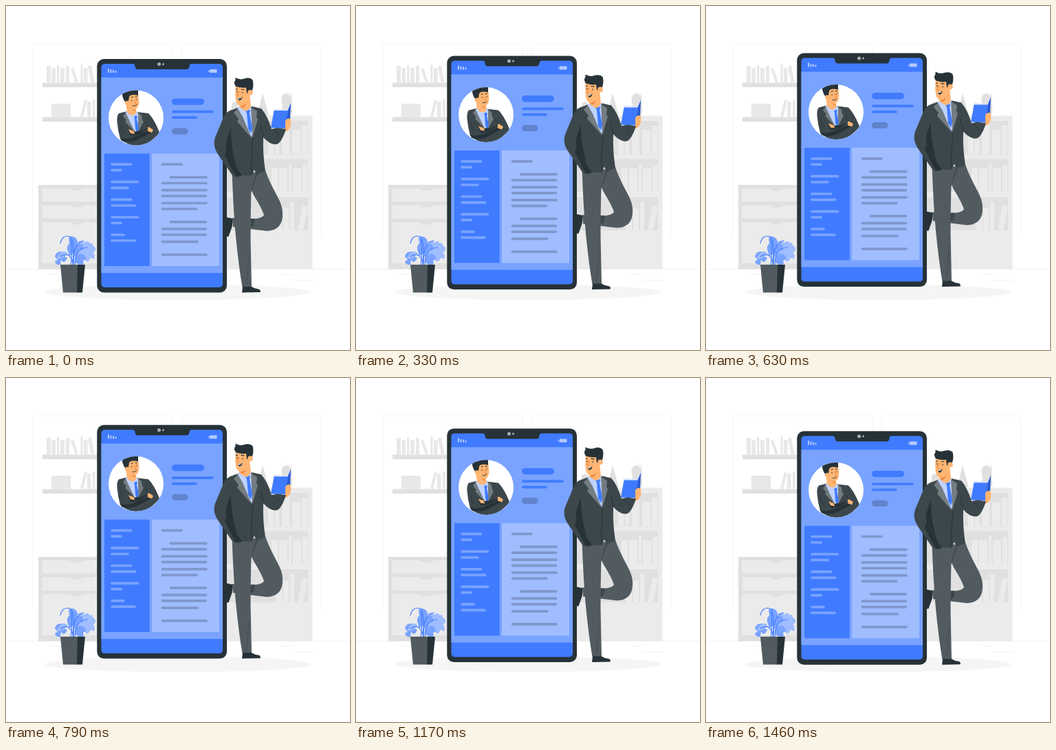
Write an HTML page that moves like this. It is 500 by 500 pixels and loops after 1500 ms.

```html
<!DOCTYPE html>
<html lang="en">
<head>
<meta charset="utf-8">
<title>Floating profile</title>
<style>
html, body { margin: 0; height: 100%; overflow: hidden; background: #fff; }
svg { display: block; width: 100%; height: 100%; }
.blue { fill: #407bff; }
.mid { fill: #79a3ff; }
.pale { fill: #9fbdff; }
.dark { fill: #263238; }
.jacket { fill: #3c474c; }
.trousers { fill: #515b60; }
.lapel { fill: #737c81; }
.shirt { fill: #c0d3ff; }
.skin { fill: #ffb573; }
.frame { fill: #ebebeb; }
.shade { fill: #e0e0e0; }
.line { fill: none; stroke-linecap: round; stroke-linejoin: round; }
</style>
</head>
<body>
<svg viewBox="0 0 500 500">
  <defs><clipPath id="disc"><circle cx="189" cy="162.5" r="40"/></clipPath></defs>

  <!-- room -->
  <g class="line" stroke="#f5f5f5">
    <path d="M39 336V58q0-3 3-3H239q3 0 3 3V336M255 336V58q0-3 3-3H455q3 0 3 3V336"/>
    <path stroke="#ededed" stroke-width=".7" d="M0 382.5H500M400 390h17M417 398.500h30M62 390h20"/>
  </g>

  <!-- wall shelves -->
  <path class="shade" d="M53 111.500h82v6.500H53zM53 161.500h82v6.500H53z"/>
  <path fill="#e8e8e8" d="M59 87h6v24.500h-6zM66.500 90h5.500v21.500h-5.500zM74 86h3.500v25.500H74zM79 90h6v21.500h-6zM87 87h5v24.500h-5zM94 91l4-1 7 20.500-4 1zM108.500 85h3v26.500h-3zM113 90h5.500v21.500H113zM119 87.500l5-1 4.500 24-5 1zM66 142h28v19.500H66zM108 160.500l6-24 4 1-6 24zM118 139h5.500v22.500H118zM126 136h3.500v25.500H126z"/>

  <!-- drawers -->
  <path class="shade" d="M47 260h90v122.500H47z"/>
  <path class="frame" d="M52.500 265H137v19.500H52.500zM52.500 289.500H137v19.500H52.500zM52.500 314H137v60H52.500z"/>
  <path class="shade" d="M89 265h28q-5 0-7 2-9 3-15 0-2-2-6-2zM89 289.500h28q-5 0-7 2-9 3-15 0-2-2-6-2zM89 314h28q-5 0-7 2-9 4-15 0-2-2-6-2z"/>

  <!-- bookcase -->
  <path class="shade" d="M365 159l8-32 9 32zM400 159l2-15q-4-12 2-16 8-3 9 4l2-7 1 30-2 4zM328 159v-17q5-6 9 0v17z"/>
  <path class="frame" d="M310 159.500H445.500V382.500H310z"/>
  <path class="shade" d="M318 167H439v48.500H318zM318 222.500H439v47.500H318zM318 278H439v48H318z"/>
  <path class="frame" d="M381 181h8v34.500h-8zM391 176h6v39.500h-6zM401 170h11v45.500h-11zM416 180h12v35.500h-12zM430 174h8v41.500h-8zM386 236h9v34h-9zM397 236h12v34h-12zM411 229h4v41h-4zM417 236h12v34h-12zM431 231h7v39h-7zM392 288h9v38h-9zM403 294h8v32h-8zM413 285h6v41h-6zM424 325l7-35 8 1.500-7 34z"/>

  <ellipse cx="250" cy="416" rx="193.500" ry="11.300" fill="#f5f5f5"/>

  <!-- plant -->
  <path class="pale" d="M104 343q5-4 10 1 4-5 8 1l3-1 1 4q5 2 4 8-3 0-3 3 3 3 1 9l-5-2q-3 7-7 5l-1-6-5 3-3-5-5 1q-3-4 2-7l-3-4q2-4 6-3z"/>
  <path class="mid" d="M91 337q5-4 10 0 4 4 3 9l6 0q4 5 1 9l-5-1q-1 8-7 11l-2-5-5 4-2-7q-3-7 2-12zM71 364q2-8 10-7 7-1 8 4l-4 3 4 2q-2 6-6 6l-3-3-1 7q-7 1-8-5l4-2zM100 366q7-9 14-4l3 6-5 2 1 4q-3 6-6 7l-2-6q-6-1-5-9z"/>
  <path class="pale" d="M82 357q6-1 7 3l-8 7-8 1q4-8 9-11z"/>
  <path class="line" stroke="#407bff" stroke-width="1.100" d="M79 345q3-13 14-10 7 4 5 42M97 377q0-32 16-36M98 377q-4-22-19-13M100 377q0-25 18-26M94 377q3-18 1-37"/>
  <path class="trousers" d="M79 376h26l-1 40.500H83z"/>
  <path class="dark" d="M104 376h11l-4 40.500h-8z"/>

  <g id="float">
    <!-- lifted foot and leg -->
    <path class="dark" d="M330 309l-1.500 12-5 14q-3.500 1-3.500-2V307z"/>

    <!-- phone -->
    <rect class="dark" x="132.300" y="77" width="188.700" height="339.500" rx="10"/>
    <rect class="blue" x="138.500" y="84" width="176.500" height="325" rx="5"/>
    <path class="dark" d="M184 83.500q3 .5 3.500 4 .5 4.500 4 4.500h71q3.500 0 4-4.500 .5-3.500 3.500-4z"/>
    <g fill="#a9afb3"><circle cx="222.500" cy="84.500" r="2.500"/><circle cx="228.500" cy="84.500" r="1.500"/></g>
    <path fill="#b3caff" d="M148 91h2v6h-2zM151.500 92.300h2V97h-2zM155 93h2v4h-2zM158.500 94h2v3h-2zM296 92h10.500v5H296zM294 93.500h1.300v2.500H294z"/>
    <path class="mid" d="M138.500 104H315V388H138.500z"/>
    <path class="blue" d="M143 214.500h65.700V378H143z"/>
    <path class="pale" d="M212 214.500h98V378h-98z"/>
    <g class="line" stroke-width="3.700">
      <path stroke="#79a3ff" d="M154 230.200h27.500M154 238.700h13M154 255.700h37.500M154 264.400h23M154 281.400h27.500M154 290h33.500M154 307h37.500M154 315.500h13M154 332.500h17M154 341h33"/>
      <path stroke="#7f97cc" d="M227.500 230.200h27.500M239.500 249h51.500M227.500 257.500h63M227.500 267.700h63.500M227.500 276.200h63M227.500 286.500h63.500M227.500 295h49M239.500 313.800h51M227.500 324h63M227.500 332.500h62.500M227.500 342.700h50.500M227.500 361.500h63.500"/>
      <path stroke="#407bff" d="M243 153.700h57M243 162.200h33"/>
    </g>
    <rect class="blue" x="241" y="134.500" width="47" height="9.300" rx="4.600"/>
    <rect x="241" y="177.500" width="23.500" height="9" rx="4.500" fill="#6183cc"/>

    <!-- portrait -->
    <circle cx="189" cy="162.500" r="40" fill="#fff"/>
    <g clip-path="url(#disc)">
      <path class="jacket" d="M176 153l-12 3q-3 3-2.500 12 1 13 4.500 25 10 10 26 10 11-1 19-7l10-9q3-2 1-6-7-17-15-25l-17-2z"/>
      <path class="shirt" d="M175 153l-2 4 15 27 4-8 1-20-4-3z"/>
      <path class="lapel" d="M174 155l-4 5 5 6-2 2 14 15zM192 155l5 4 1 7 2 2-8 15z"/>
      <path class="blue" d="M186 161l3-2 2 2-1 3 3 13-2 6-3-4-1-15z"/>
      <path class="skin" d="M174 140l2 14q5 7 11 4l3-4-2-6z"/>
      <path fill="#ed893e" d="M181 148q4 4 7 2v3q-4-1-7-5z"/>
      <path class="skin" d="M174 136l5-7 13-2q3 15-.5 20-3 5-9 1.500l-5-5z"/>
      <path class="dark" d="M171 136q-4-9-.5-12v-4q5 3 11 1 8-3 10.500 0v9l-6-1q-6 0-7 3l-1 6-4 3z"/>
      <circle class="skin" cx="175.800" cy="140.800" r="3"/>
      <g class="line" stroke="#263238" stroke-width="1">
        <path d="M183 137v1M190 135.500v1M182 133l2.500-1M188 132h2.500M184 145q4 1 6-2"/>
        <path stroke="#ed893e" d="M187 136l2 5-2 .5"/>
      </g>
      <path class="dark" d="M166 192q9 2 19-1l26-12 3 3-24 13q-12 5-22 1zM178 183l17-1 13-5-13 9-13 3z"/>
      <path class="skin" d="M178 179l8 3 1 4-6-1zM206 176l2 0 6 4-2 4-6-2z"/>
      <path class="line" stroke="#263238" stroke-width=".8" d="M167 173q1 9 4 13M203 169q1 6 5 7M190 187l-3 5"/>
    </g>

    <!-- legs -->
    <path class="trousers" d="M357 246l20-7q5 15 17 37 8 14 8 25 1 25-23 26l-49-6-1-13 27 2q16-1 19-6-3-10-15-29-8-14-3-29z"/>
    <path class="jacket" d="M355 248l11-5-10 28zM355 309l7 0-2 10-5 3z"/>
    <path class="trousers" d="M328.500 240q2 60 6 100 4 40 9 69H357l-1.500-70q0-40 1-70 2-10 8-27z"/>
    <path class="line" stroke="#3c474c" stroke-width=".8" stroke-dasharray="2 2" d="M350 404l3-40"/>
    <path class="dark" d="M344 408h13q4 3 10 3.500 4 1.500 2.500 4.500l-26.500.5z"/>

    <!-- far forearm, hand and book -->
    <path class="skin" d="M404 182l2-16q1-5 6-6 3 6 2 13-1 6-6 9z"/>
    <path fill="#dce7ff" d="M389 152l1-3 18 2 5-9v12l-7 23-18-2z"/>
    <path fill="#2a5bd0" d="M409 153l5-12-1 24-7 13z"/>
    <path class="blue" d="M389.500 152h20.500l-4 26-21-1z"/>
    <path class="skin" d="M406 167q3-5 7-3 2 6-1 11l-6 5z"/>

    <!-- jacket -->
    <path class="jacket" d="M339 147l-13 5q-5 25 2 59l1 32q15 5 28 3l4-8 3 7 13-5q-4-25-3-49 10 11 19 10 7-1 14-22l-13-2-8 2q-6-20-15-30l-13-3z"/>
    <path class="dark" d="M327 168q-12 22-10 38l13 26 6 7-6-26q-4-22-3-45z"/>
    <path class="jacket" d="M328 151q-10 3-14 16l-10 24q-4 11 3 23l22 32q7 5 14 1l-9-13-13-25q-3-7 1-18l7-20z"/>
    <path class="dark" d="M321 209l11 22 11 15-9 2-16-31z"/>
    <path class="line" stroke="#263238" stroke-width=".9" d="M374 190l-4-17M359 193q-3 25-2 53M390 181l8 8"/>

    <path class="shirt" d="M339 145l-3 5 21 41 3-11-3-33-3-3z"/>
    <path class="lapel" d="M337 149l-6 6 7 9-2 4 21 24-13-31zM356 147l9 6-1 9 2 3-8 27-1-26z"/>
    <path class="blue" d="M348 152l3-3 4 3-1 4 4 21-2 8-4-6-2-23z"/>

    <!-- head -->
    <path class="skin" d="M339 138v8q7 8 13 6l4-6-2-19z"/>
    <path fill="#ed893e" d="M341 144q6 1 9-4-3 8-8 8z"/>
    <path class="skin" d="M334 115q-2 17 1 25 3 7 10 4l8-6 1-22-9-4z"/>
    <path class="dark" d="M334 117q-4-6-.5-9v-4q6 4 13 1.500 8-2.500 12 2 2 7-.5 15l-5 5-3-1-1-8q-8 1-15-1.500z"/>
    <circle class="skin" cx="355" cy="125.800" r="3.800"/>
    <g class="line" stroke="#263238" stroke-width="1.100">
      <path d="M336 124v1.300M344 125v1.300M334.500 121l2-.5M342 121l4 .500"/>
      <path stroke="#ed893e" d="M339 124l-3 6 2.500.5"/>
    </g>
    <path class="dark" d="M336.500 133q4 1 7-1-1 6-5 5z"/>
    <path fill="#fff" d="M337 133.200q3 .8 5.500-.5-1 2.500-5 2z"/>
  </g>
</svg>
<script>
const PERIOD = 1500, LIFT = 10, LEAD = 30;
const float = document.getElementById('float');

// Linear rise and fall, caught shortly after the lowest point.
const height = ms => LIFT * (1 - Math.abs(1 - 2 * (ms % PERIOD) / PERIOD));

function draw() {
  const y = height(LEAD) - height(performance.now() + LEAD);
  float.setAttribute('transform', `translate(0 ${y.toFixed(2)})`);
  requestAnimationFrame(draw);
}
draw();
</script>
</body>
</html>
```
